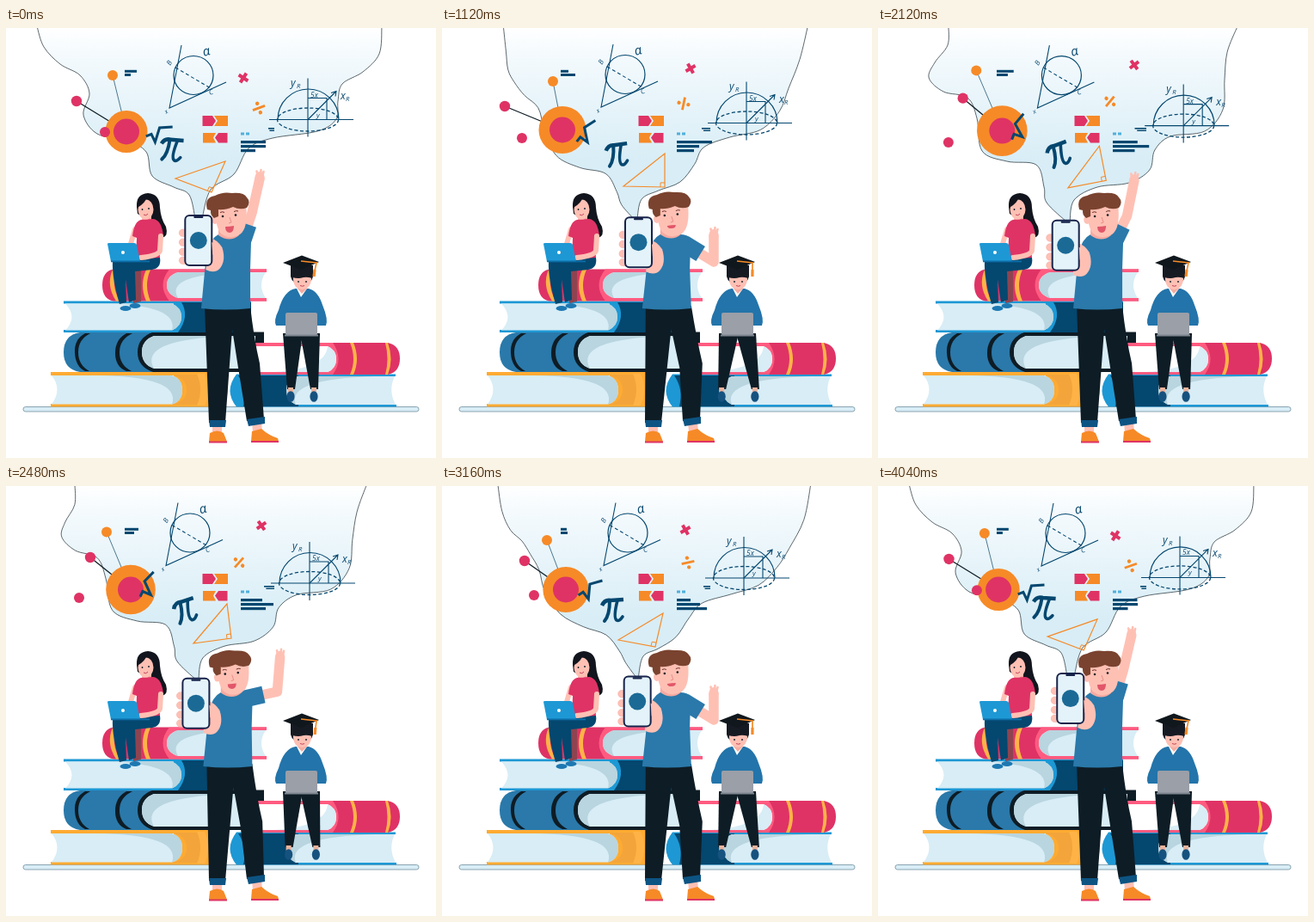
Recreate the animation shown at these times as an HTML page. Size 500 px wide and 500 px high, loop 4.08 s.

```html
<!DOCTYPE html>
<html lang="en">
<head>
<meta charset="utf-8">
<title>Learning</title>
<style>
html, body { margin: 0; width: 100%; height: 100%; overflow: hidden; background: #fff; }
svg { display: block; width: 100vw; height: 100vh; }
text { font-family: "Open Sans", "Liberation Sans", sans-serif; font-style: italic; fill: #0b4a72; }
</style>
</head>
<body>
<svg viewBox="0 0 500 500">
  <defs>
    <linearGradient id="mist" gradientUnits="userSpaceOnUse" x1="0" y1="0" x2="0" y2="155">
      <stop offset="0" stop-color="#fff"/><stop offset=".2" stop-color="#f4fafd"/><stop offset="1" stop-color="#d8edf6"/>
    </linearGradient>
  </defs>
  <g id="ideas"></g>
  <g id="books"></g>
  <g id="people"></g>
</svg>
<script>
const LOOP = 4080, WAVE = 2040;
const NAVY = '#04476f', BLUE = '#1d98d4', SHIRT = '#2a79aa', PALE = '#d8edf6', SHADE = '#b9d5df',
      PINK = '#df3365', ORANGE = '#f68a27', YELLOW = '#ffb347', SKIN = '#ffc0b4', INK = '#0e1c25';

const path = (d, fill, extra = '') => `<path d="${d}" fill="${fill}" ${extra}/>`;
const line = (d, color, w = 1, extra = '') =>
  `<path d="${d}" fill="none" stroke="${color}" stroke-width="${w}" ${extra}/>`;
const round = 'stroke-linecap="round" stroke-linejoin="round"';
const oval = (x, y, rx, ry, fill, extra = '') =>
  `<ellipse cx="${x}" cy="${y}" rx="${rx}" ry="${ry}" fill="${fill}" ${extra}/>`;
const dot = (x, y, r, fill) => oval(x, y, r, r, fill);
const bar = (x, y, w, h, fill, extra = '') =>
  `<rect x="${x}" y="${y}" width="${Math.max(0, w)}" height="${h}" fill="${fill}" ${extra}/>`;
const label = (s, x, y, size, turn = 0) =>
  `<text font-size="${size}" transform="translate(${x} ${y}) rotate(${turn})">${s}</text>`;
const place = ([x, y, turn = 0], body) =>
  `<g transform="translate(${x} ${y}) rotate(${turn})">${body}</g>`;

// Smooth periodic curve through poses at uneven times.
const TIMES = [0, 480, 1120, 1720, 2480, 3160];
function at(t, poses, times = TIMES, loop = LOOP) {
  const n = times.length;
  const time = k => times[(k + n) % n] + loop * Math.floor(k / n);
  const pose = k => poses[(k + n) % n];
  t %= loop;
  let i = n - 1;
  while (times[i] > t) i--;
  const span = time(i + 1) - time(i), s = (t - time(i)) / span;
  return pose(i).map((a, j) => {
    const b = pose(i + 1)[j];
    const m0 = (b - pose(i - 1)[j]) / (time(i + 1) - time(i - 1)) * span;
    const m1 = (pose(i + 2)[j] - a) / (time(i + 2) - time(i)) * span;
    return a + m0 * s + (3 * (b - a) - 2 * m0 - m1) * s * s + (2 * (a - b) + m0 + m1) * s ** 3;
  });
}

// Curve through a list of points, without the opening move.
function through(pts) {
  const last = pts.length - 1, p = i => pts[Math.min(last, Math.max(0, i))];
  let d = '';
  for (let i = 0; i < last; i++) {
    const c = [0, 1].map(k => p(i)[k] + (p(i + 1)[k] - p(i - 1)[k]) / 6);
    const e = [0, 1].map(k => p(i + 1)[k] - (p(i + 2)[k] - p(i)[k]) / 6);
    d += `C${c} ${e} ${p(i + 1)}`;
  }
  return d;
}

const points = s => s.split(' ').map(p => p.split(',').map(Number));
const LEFT = [
  '36,-2 44,22 63,42 86,55 97,76 90,101 106,123 140,131 163,144 170,172 195,185 213,194 220,222',
  '60,-2 66,30 80,52 97,64 106,80 112,100 119,125 140,148 166,163 190,175 207,192 216,205 226,222',
  '82,-2 81,20 66,40 59,58 76,74 104,81 115,105 121,143 150,155 184,159 193,185 196,203 220,226'
].map(points);
const RIGHT = [
  '437,-2 434,30 415,51 391,65 386,85 384,106 362,120 310,128 282,140 265,170 238,188 228,222',
  '431,-2 424,40 405,72 388,92 368,112 340,124 305,134 285,150 270,172 252,188 235,197 229,222',
  '418,-2 406,28 403,60 401,95 380,120 340,126 322,142 316,165 292,180 255,185 228,200 223,226'
].map(points);

function cloud(t) {
  const turn = 2 * Math.PI * t / LOOP;
  const u = Math.cos(turn + .377 * Math.sin(turn));
  const blend = ([a, b, c]) => b.map((p, i) => p.map((v, k) =>
    v + u * (a[i][k] - c[i][k]) / 2 + u * u * ((a[i][k] + c[i][k]) / 2 - v)));
  const l = blend(LEFT), r = blend(RIGHT).reverse();
  return path(`M${l[0]}${through(l)}L${r[0]}${through(r)}Z`, 'url(#mist)', 'stroke="#1a2930" stroke-width=".7"');
}

function molecule(t) {
  const [x, y, r] = at(t, [[140,120.5,24.5], [139,120.5,25.3], [140,118.5,27.5], [143,118.5,29.3], [145,120.5,28.8], [144,120.5,26.6]]);
  const top = at(t, [[124,55], [126,61], [129,62], [114,48], [117,53.5], [122,63]]);
  const far = at(t, [[82,85], [79,89], [73,91], [96,82], [98,83], [96,87]]);
  const near = at(t, [[115,121], [109,119], [93,128], [83,135], [85,130], [107,127]]);
  return line(`M${top}L${x},${y}`, '#4d788f') + line(`M${far}L${x},${y}`, INK, 1.3) +
    dot(...top, 6, ORANGE) + dot(...far, 6.2, PINK) +
    dot(x, y, r, ORANGE) + dot(x, y, 15, PINK) + dot(...near, 6, PINK);
}

function circleProof(t) {
  const pos = at(t, [[218,55], [216,54.5], [213,54], [213,55.5], [214,54.5], [216,54.5]]);
  return place(pos, oval(0, 0, 23, 22.5, 'none', `stroke="${NAVY}" stroke-width="1.2"`) +
    line('M-14-35L-28 38L38 8', NAVY, 1.1) +
    line('M-21-9L20 15', NAVY, 1.1, 'stroke-dasharray="4 3"') +
    label('B', -27, -11, 8, -60) + label('C', 19, 23, 8, -20) + label('α', 12, -22, 15, -15) + label('x', -32, 45, 7, -30));
}

function dome(t) {
  const pos = at(t, [[351,106.5], [350,109], [354,110.5], [357,113], [353,113], [351,107]]);
  return place(pos, line('M-35 0A35 35 0 0 1 36 0', NAVY, 1.2) +
    line('M-45 0H53M0-48V20', NAVY, 1.1) +
    oval(0, 0, 35.5, 13.5, 'none', `stroke="${NAVY}" stroke-width="1.3" stroke-dasharray="4 2.5"`) +
    line('M0 0L33-33M27-31L33-33L32-27M0-25H22V0', NAVY, 1.1) +
    label('y', -20, -39, 12) + label('R', -13, -37, 7.5) + label('5x', 3, -26, 8.5) +
    label('x', 38, -24, 12) + label('R', 44, -22, 7.5) + label('y', 10, -3, 8));
}

function triangle(t) {
  const [ax, ay, bx, by, cx, cy] = at(t, [[197,175,255,155,239,191], [200,174,255,152,242,188], [211,184,259,146,259,185],
    [221,188,258,140,266,180], [218,183,257,137,262,177], [205,179,257,148,248,187]]);
  const toward = (x, y) => { const d = Math.hypot(x - cx, y - cy) / 5; return [(x - cx) / d, (y - cy) / d]; };
  const [px, py] = toward(ax, ay), [qx, qy] = toward(bx, by);
  return path(`M${ax},${ay}L${bx},${by}L${cx},${cy}Z`, 'none', `stroke="${ORANGE}" stroke-width="1.2"`) +
    line(`M${cx + px},${cy + py}l${qx},${qy}L${cx + qx},${cy + qy}`, ORANGE);
}

function symbols(t) {
  const root = at(t, [[178,124,4], [177,123,0], [169,123,-25], [165,119,-40], [166,117,-38], [173,122,-8]]);
  const pi = at(t, [[192,141,8], [195,139.5,2], [203,147,-4], [209,149,-15], [208,145,-14], [198,144,0]]);
  const times = at(t, [[276,58,-12], [280,59,-4], [289,47,15], [296,41,8], [297,46,10], [283,51,15]]);
  const divide = at(t, [[294,93,-20], [291,97,-28], [281,88,-78], [272,82,-52], [271,89,-48], [286,89,-12]]);
  return place(root, line('M-15 3L-9 0L-4 9L0-8L15-10', NAVY, 3)) +
    place(pi, line('M-12-5Q-9-12-2-11L13-12', NAVY, 4.5) + line('M-3-11Q-3 6-9 13', NAVY, 4, round) +
      line('M6-11Q1 9 5 12Q8 14 12 8', NAVY, 3.6, round)) +
    place(times, line('M-4.5-4.5L4.5 4.5M4.5-4.5L-4.5 4.5', PINK, 4)) +
    place(divide, line('M-7.5 0H7.5', ORANGE, 2.8) + dot(0, -5.5, 2.2, ORANGE) + dot(0, 5.5, 2.2, ORANGE));
}

function notes(t) {
  const head = at(t, [[14,7], [12,11], [9,17], [21,15], [16,11], [7,8]]);
  const body = at(t, [[29,29,17], [34,24,18], [41,26,20], [33,43,22], [25,38,29], [16,27,35]]);
  const [dash] = at(t, [[7], [8], [10], [14], [12], [8]]);
  return head.map((w, i) => bar(138, 48.8 + i * 4.2, w, 3, NAVY)).join('') +
    body.map((w, i) => bar(273, 131 + i * 5, w, 3.2, NAVY)).join('') +
    bar(312 - dash, 116, dash, 1.6, NAVY) + bar(312 - dash * .8, 118.6, dash * .8, 1.4, NAVY) +
    bar(273, 121.5, 4, 3, '#4fb0dc') + bar(279, 121.5, 4, 3, '#4fb0dc');
}

const flags = path('M228.5 102H240L244 108L240 114H228.5Z', PINK) + path('M242 102H258V114H242L246 108Z', ORANGE) +
  path('M229 122H244L241 127.500L244 133.500H229Z', ORANGE) + path('M247 122H257.500V133.500H247L243 127.500Z', PINK);

function bookStack() {
  return bar(20, 440.5, 460, 5.5, PALE, 'rx="2.700" stroke="#71909f" stroke-width=".8"') +
    // bottom row
    path('M52 400H252Q264 420 252 440.500H52V437H195V404H52Z', '#ffab32') +
    path('M53 404H193Q205 408 205 421T193 437.500H53Q66 420 53 404Z', PALE) +
    path('M105 404H193Q205 408 205 421T193 437.500Q204 405 105 404Z', SHADE) +
    path('M193 403Q210 407 210 421T193 438H225Q232 420 225 403Z', '#f3a53b') +
    path('M222 402H231Q239 420 231 439H222Q230 420 222 402Z', YELLOW) +
    path('M268 402.500H453V405H340V438H454V440.500H268Q253 422 268 402.500Z', BLUE) +
    path('M270 404H340V440H276Q281 420 270 404Z', NAVY) +
    path('M452 405H337Q326 409 326 421T337 438H453Q444 421 452 405Z', PALE) +
    path('M430 405H337Q326 409 326 421T337 438Q325 408 430 405Z', SHADE) +
    // middle row
    path('M86 354H300V357H170V397H290V400H86Q67 397 67 377T86 354Z', SHIRT) +
    path('M92 355Q79 362 80 378T92 399H97Q84 392 84 377T98 355Z', INK) +
    path('M140 355Q127 362 127 378T140 399H146Q132 392 132 377T147 355Z', INK) +
    path('M300 353.500H171Q153 360 153 377T171 400H290V396H300V357Z', INK) +
    path('M295 358H172Q158 363 158 377T172 396H290V358Z', PALE) +
    path('M262 358H172Q158 363 158 377T172 396Q153 362 262 358Z', SHADE) +
    path('M288 366H444Q458 369 458 384.500T444 403H288V400H375V369H288Z', PINK) +
    path('M288 366H380Q393 385 380 403H288Z', '#ff5b80') +
    path('M288 370H374Q384 374 384 385T374 400H288Z', '#fff') +
    path('M312 400Q372 396 374 370Q384 374 384 385T374 400Z', PALE) +
    path('M400 366H404Q412 385 404 403H400Q408 385 400 366Z', YELLOW) +
    path('M441 366H444Q451 385 444 403H441Q446 385 441 366Z', YELLOW) +
    // third row
    path('M67 317.500H285V354H67V351H195V320.500H67Z', BLUE) + path('M204 319H285V354H200Q214 335 204 319Z', NAVY) +
    path('M69 320.500H193Q204 325 204 336T193 351.500H69Q84 336 69 320.500Z', PALE) +
    path('M115 320.500H193Q204 325 204 336T193 351.500Q201 322 115 320.500Z', SHADE) +
    // top row
    path('M125 280.500H303V284H200V314H303V317.500H125Q112 315 112 299T125 280.500Z', PINK) +
    path('M190 280.500H303V284H198V314H303V317.500H190Q175 299 190 280.500Z', '#ff5b80') +
    path('M124 281H128Q122 299 132 317.500H128Q116 299 124 281Z', YELLOW) +
    path('M163 281H168Q160 299 168 317.500H163Q155 299 163 281Z', YELLOW) +
    path('M302 284H200Q187 288 187 299T200 314H302Q292 299 302 284Z', PALE) +
    path('M270 284H200Q187 288 187 299T200 314Q184 287 270 284Z', SHADE);
}

const girl =
  path('M148 283L157 281V318L148 320Z', '#8e4350') +
  path('M152 208Q151 193 165 192Q179 193 179 209Q180 222 186 231Q189 242 182 244Q172 240 170 226L153 216Z', '#12151d') +
  path('M159 215H169V226Q163 230 158 224Z', '#f5ada2') +
  line('M150 234L145 251', SKIN, 6, round) +
  path('M157 223L171 222Q181 223 183 242L178 242L179 268H151L152 244L147 242Q149 225 157 223Z', PINK) +
  oval(162.5, 211, 9, 11.5, SKIN) +
  path('M152.500 209Q153 196 164 196Q162 204 152.500 209ZM163 197Q174 199 172 218Q179 204 169 195Z', '#12151d') +
  dot(158.500, 211, .9, INK) + dot(166, 210, .9, INK) + line('M160 217Q163 219 165 216', '#c2455a') +
  path('M124 271L179 267Q181 279 170 281L150 283L151 316L143 319L139 292L140 319L132 321Q123 290 124 271Z', NAVY) +
  line('M180 242L179 259Q177 265 157 267', SKIN, 6, round) +
  path('M118 251Q118 250 120 250H149Q151 250 152 252L156 271.500H122Z', BLUE) + bar(122, 270.500, 45, 1.800, '#0d6ea9') +
  dot(136, 261, 2, '#fff') + oval(139, 326, 6.500, 3, '#1d78b2') + oval(150, 323, 6.500, 3, '#1d78b2');

function graduate(s) {
  const l = 331 - 6 * s, r = 358 + 6 * s;
  const leg = (a, b, x) => path(`M${a},355H${b}L${x + 5},420H${x - 4}Z`, INK) +
    bar(x - 3, 418, 6, 6, '#e9b39c') + oval(x, 428.5, 4.6, 6.3, '#16527f');
  return leg(322, 345, l) + leg(342, 365, r) +
    path('M337 303Q323 305 317 328Q311 340 314 346H372Q375 339 368 322Q363 306 352 303Z', '#2374aa') +
    path('M338 303H350L343 313Z', '#fff') + path('M339 298H350V303L344 309L339 303Z', '#f5ada2') +
    path('M331 276H357V289Q355 298 344 298T331 289Z', '#161a22') +
    path('M334 288H355Q356 303 344 304Q333 303 334 288Z', SKIN) +
    path('M332 281H356V291Q350 289 346 290Q340 292 333 290Z', '#161a22') +
    dot(340, 295, .9, INK) + dot(349, 295, .9, INK) + line('M342 299.500Q345 301 347 299.500', '#c2455a') +
    path('M322 273L344 264.500L364 272L343 281Z', '#10171d') +
    line(`M343 271L361 273L${358 + 3 * s} 287`, ORANGE, 1.7) + line(`M${359 + 2 * s} 281L${358 + 3 * s} 289`, ORANGE, 3.2) +
    bar(325, 331, 37, 26.5, '#9a9fa8', 'rx="2"') + bar(324, 356.5, 39, 2, '#7f858f');
}

function man(t) {
  const s = (1 - Math.cos(2 * Math.PI * t / WAVE)) / 2;
  const h = 6 * s, a = 7 * s, k = 8 * s;
  const [sx, sy, ex, ey, hx, hy] = at(t, [[276,245,286,215,295,175], [280,247,316,240,319,201],
    [282,251,316,272,316,242], [278,247,296,212,304,179]], [0, 460, 1120, 1720], WAVE);
  const mx = sx + (ex - sx) * .55, my = sy + (ey - sy) * .55;

  const shoes = bar(240, 461, 11, 12, SKIN) + path('M286 458H297L298 470H287Z', SKIN) +
    path('M237 471Q246 466 253 471L257 481H236Z', ORANGE) + path('M286 469L297 466Q306 474 316 477L317 480.500H285Z', ORANGE) +
    bar(236, 480.5, 21, 2, PINK) + bar(285, 480, 32, 2, PINK);
  const pants = path(`M${231 + h},323H${284 + h}Q${288 + k},360 ${295 + k},390L300,455L280,457L${270 + k * .8},395L${263 + h * .6},350L255,459H236Z`, INK) +
    path('M236 456H256L255 464H237Z', '#0d5483') + path('M280 455L301 452V460L282 463Z', '#0d5483');
  const arm = line(`M${sx},${sy}L${ex},${ey}L${hx},${hy}`, SKIN, 11.5, round) +
    oval(hx, hy - 1, 5.6, 7, SKIN) +
    line(`M${hx - 2.5},${hy - 4}l-1-4.500M${hx + 1},${hy - 5}l.500-5M${hx + 3.5},${hy - 4}l1-4`, SKIN, 2.6, round);
  const torso = path(`M${247 + a},240Q${237 + a},245 ${233 + a},262L${227 + h},326Q${255 + h},329 ${284 + h},326L${284 + a * .6},280L${285 + a * .6},248Q${280 + a},240 ${271 + a},240Z`, SHIRT) +
    line(`M${sx - 4},${sy + 2}L${sx},${sy}L${mx},${my}`, SHIRT, 20, 'stroke-linejoin="round"');
  const head = place([a, -s], path('M247 234H271V241Q260 250 247 241Z', '#f5a9a0') +
    path('M243 205H279Q282 233 272 240Q260 247 250 239Q243 232 243 205Z', SKIN) + oval(243, 223, 3.8, 5, SKIN) +
    path('M234 211Q230 197 243 195Q252 190 263 192Q277 191 280 197Q285 202 280 209Q272 212 264 208Q254 212 247 211V219L242 221Q237 217 238 212Z', '#7a432f') +
    dot(252, 219, 1.3, INK) + dot(267, 217.5, 1.3, INK) + line('M249 214.500Q252 213 254 214.500M265 213.500Q268 212 270 213', '#6b332b') +
    line('M260 220L262 226L259 227', '#e98f88') +
    path(`M255 231Q260 ${231 - s} 265 230Q265 ${238 - 4 * s} 260 ${238 - 4 * s}T255 231Z`, '#e2566a'));
  return shoes + pants + arm + torso + head + phone(t, a);
}

function phone(t, lean) {
  const sway = 3 * Math.cos(2 * Math.PI * (t / LOOP - .06));
  const fingers = [17, 28, 39, 49].map(y => bar(-6, y, 11, 8.5, SKIN, 'rx="4.200" stroke="#f0a79f" stroke-width=".5"')).join('');
  return place([204.5 + sway + lean, 219.8 - sway],
    path('M30 27Q38 29 44 38Q49 54 41 63Q35 69 25 64Z', SKIN) + fingers +
    bar(1, 1, 31, 58, '#e4f3f9', 'rx="5" stroke="#17234a" stroke-width="2"') +
    bar(11, 1.8, 11, 2.2, '#17234a', 'rx="1"') + dot(16.5, 30, 10, '#1b6a96') +
    path('M32 32Q38 34 37 42L33 47Z', SKIN));
}

const [ideas, books, people] = ['ideas', 'books', 'people'].map(id => document.getElementById(id));
books.innerHTML = bookStack() + girl;

function draw(now) {
  const t = now % LOOP;
  const s = (1 - Math.cos(2 * Math.PI * t / WAVE)) / 2;
  ideas.innerHTML = cloud(t) + circleProof(t) + dome(t) + molecule(t) + symbols(t) + flags + notes(t) + triangle(t);
  people.innerHTML = graduate(s) + man(t);
}

const start = performance.now();
function tick() {
  draw(performance.now() - start);
  requestAnimationFrame(tick);
}
tick();
</script>
</body>
</html>
```
